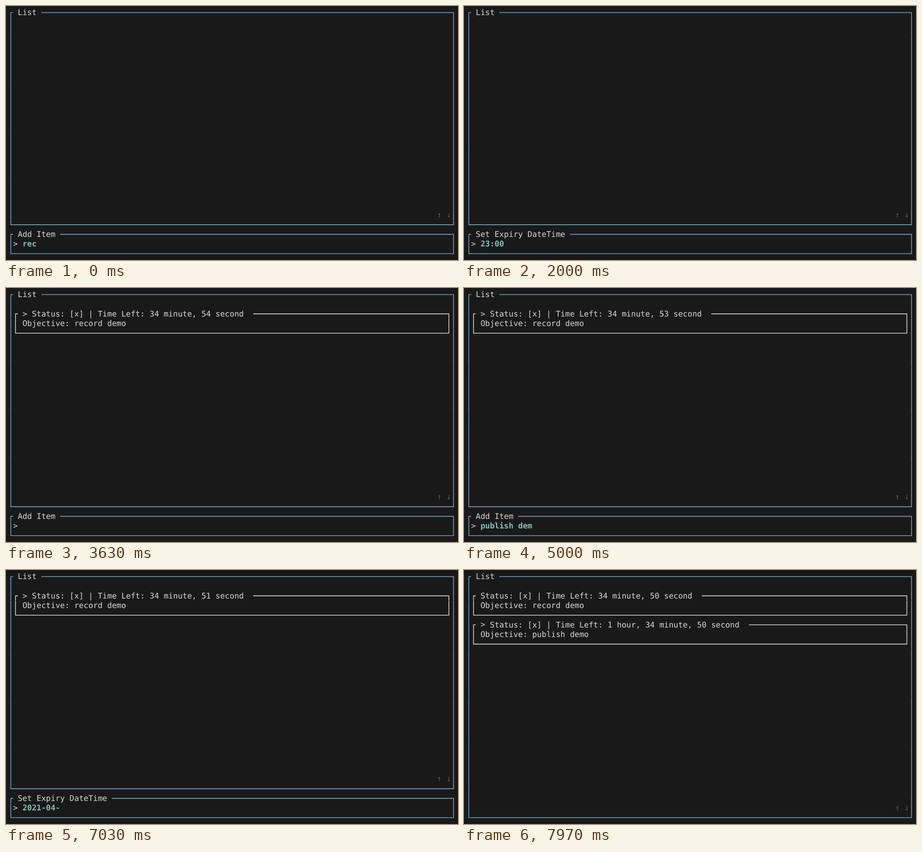
An HTML page for the animation above (8 s loop, 998x561 px).

```html
<!DOCTYPE html>
<html lang="en">
<head>
<meta charset="utf-8">
<title>Terminal to-do list</title>
<style>
  html, body { margin: 0; width: 100%; height: 100%; overflow: hidden; background: #191919; }
  svg { display: block; width: 998px; height: 561px; }
  text {
    font: 17.28px "DejaVu Sans Mono", monospace;
    text-rendering: geometricPrecision;
    white-space: pre;
    fill: #d8d8d8;
    /* an imperceptible turn keeps baselines at fractional heights */
    transform-box: fill-box;
    transform: rotate(.02deg);
  }
  .typed { font-weight: 700; fill: #86c1b9; }
  .dim { fill: #585858; }
  path { fill: none; stroke: #73a9c0; stroke-width: 1.6; }
  .item { stroke: #d8d8d8; }
</style>
</head>
<body>
<svg id="screen" viewBox="0 0 998 561"></svg>
<script>
const LOOP = 8000;
const CELL_W = 10.4, CELL_H = 21.3, LEFT = 5.2, TOP = 14.5;
const HALF_LINE = 10.5; // frame sides stop just short of the row edge

// Moments at which a key switches the screen, in ms
const KEY = { firstName: 950, firstDate: 3200, secondName: 5500, secondDate: 7420, leave: 7600, down: 7720 };

const screen = document.getElementById('screen');
const colX = col => LEFT + col * CELL_W;
const midX = col => colX(col) + 5.4;
const midY = row => TOP + row * CELL_H;

function text(col, row, str, cls = '') {
  const safe = str.replace(/>/g, '&gt;');
  return `<text class="${cls}" x="${colX(col).toFixed(2)}" y="${(midY(row) + 5.5).toFixed(2)}">${safe}</text>`;
}

// A frame between two columns, with a gap in its top edge for the title
function box(top, bottom, col0, col1, title, gapEnd, cls = '') {
  const x0 = midX(col0), x1 = midX(col1), y0 = midY(top), y1 = midY(bottom);
  let d = `M${x0 - 0.8} ${y0}H${colX(col0 + 1)}M${colX(gapEnd)} ${y0}H${x1 + 0.8}M${x0 - 0.8} ${y1}H${x1 + 0.8}`;
  for (let row = top; row <= bottom; row++) {
    const from = row === top ? y0 : midY(row) - HALF_LINE;
    const to = row === bottom ? y1 : midY(row) + HALF_LINE;
    for (const x of [x0, x1]) d += `M${x} ${from}V${to}`;
  }
  return `<path class="${cls}" d="${d}"/>` + text(col0 + 2, top, title);
}

const panel = (top, bottom, title) => box(top, bottom, 0, 94, title, title.length + 3);

function item(top, selected, timeLeft, objective) {
  const title = `${selected ? '> ' : ''}Status: [x] | Time Left: ${timeLeft}`;
  return box(top, top + 2, 1, 93, title, title.length + 5, 'item')
    + text(3, top + 1, 'Objective: ' + objective);
}

const typed = (str, start, step, t) => str.slice(0, Math.max(0, Math.floor((t - start) / step)));

function prompt(t) {
  if (t < KEY.firstName) return ['Add Item', typed('record demo', -285, 90, t)];
  if (t < KEY.firstDate) return ['Set Expiry DateTime', typed('23:00:00', 1300, 130, t)];
  if (t < KEY.secondName) return ['Add Item', typed('publish demo', 3720, 112, t)];
  if (t < KEY.secondDate) return ['Set Expiry DateTime', typed('2021-04-10', 5770, 150, t)];
  return ['Add Item', ''];
}

function view(t) {
  const editing = t < KEY.leave;
  const bottom = editing ? 22 : 25;
  let out = panel(0, bottom, 'List')
    + text(91, bottom - 1, '↑', 'dim') + text(93, bottom - 1, '↓', 'dim');

  if (t >= KEY.firstDate) {
    const seconds = 54 - Math.floor((t - KEY.firstDate) / 1000);
    const left = `34 minute, ${seconds} second`;
    const onSecond = t >= KEY.down;
    out += item(2, !onSecond, left, 'record demo');
    if (t >= KEY.secondDate) out += item(5, onSecond, '1 hour, ' + left, 'publish demo');
  }
  if (editing) {
    const [title, value] = prompt(t);
    out += panel(23, 25, title) + text(1, 24, '>') + text(3, 24, value, 'typed');
  }
  return out;
}

let shown = '';
function draw() {
  const next = view(performance.now() % LOOP);
  if (next !== shown) screen.innerHTML = shown = next;
  requestAnimationFrame(draw);
}
draw();
</script>
</body>
</html>
```
